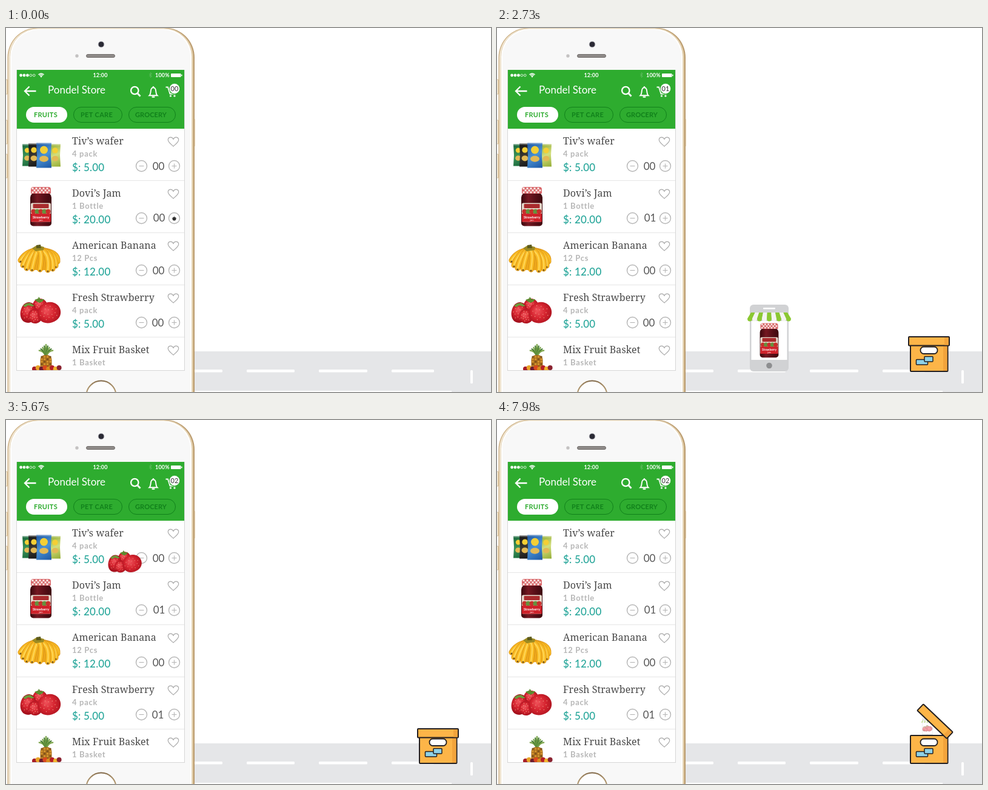
These frames come from a looping animation (800 px wide and 600 px high, 8 s). An HTML page with a canvas:

```html
<!DOCTYPE html>
<html lang="en">
<head>
<meta charset="utf-8">
<title>Store order</title>
<style>
  html, body { margin: 0; width: 100%; height: 100%; overflow: hidden; background: #fff; }
  canvas { display: block; }
</style>
</head>
<body>
<canvas id="stage" width="800" height="600"></canvas>
<script>
const LOOP = 8000, STEP = 70, SECOND_TAP = 4480, CYCLE = 4550;
const SANS = 'Lato, "Open Sans", sans-serif', SERIF = '"Noto Serif", serif';
const GREEN = '#2eac2f', GREY = '#b5b5b5', INK = '#231f20';

const stage = document.getElementById('stage').getContext('2d');
const layer = document.createElement('canvas');
layer.width = 800;
layer.height = 600;
const layerCtx = layer.getContext('2d');
let g = stage;

// ---------- helpers ----------
function paint(fill, stroke, width = 1) {
  if (fill) { g.fillStyle = fill; g.fill(); }
  if (stroke) { g.strokeStyle = stroke; g.lineWidth = width; g.stroke(); }
}
function box(x, y, w, h, r, fill, stroke, width) {
  g.beginPath();
  g.roundRect(x, y, w, h, r);
  paint(fill, stroke, width);
}
function oval(x, y, rx, ry, fill, stroke, width) {
  g.beginPath();
  g.ellipse(x, y, rx, ry, 0, 0, Math.PI * 2);
  paint(fill, stroke, width);
}
const disc = (x, y, r, fill, stroke, width) => oval(x, y, r, r, fill, stroke, width);
function shape(d, fill, stroke, width = 1) {
  const path = new Path2D(d);
  if (fill) { g.fillStyle = fill; g.fill(path); }
  if (stroke) { g.strokeStyle = stroke; g.lineWidth = width; g.stroke(path); }
}
function text(str, x, y, font, fill, spacing = 0, align = 'left') {
  g.font = font;
  g.letterSpacing = spacing + 'px';
  g.textAlign = align;
  g.fillStyle = fill;
  g.fillText(str, x, y);
}
function at(x, y, scale, draw) {
  g.save();
  g.translate(x, y);
  g.scale(scale, scale);
  draw();
  g.restore();
}
function blend(x0, y0, x1, y1, ...colours) {
  const fill = g.createLinearGradient(x0, y0, x1, y1);
  colours.forEach((colour, i) => fill.addColorStop(i / (colours.length - 1), colour));
  return fill;
}
// Composite a whole drawing at one opacity.
function faded(alpha, draw) {
  if (alpha <= 0) return;
  if (alpha >= 1) return draw();
  layerCtx.clearRect(0, 0, 800, 600);
  g = layerCtx;
  draw();
  g = stage;
  g.globalAlpha = alpha;
  g.drawImage(layer, 0, 0);
  g.globalAlpha = 1;
}
// Linear interpolation through [time, value] pairs.
function track(t, ...keys) {
  if (t <= keys[0][0]) return keys[0][1];
  for (let i = 1; i < keys.length; i++) {
    const [t0, a] = keys[i - 1], [t1, b] = keys[i];
    if (t <= t1) return a + (b - a) * (t - t0) / (t1 - t0);
  }
  return keys[keys.length - 1][1];
}
const easeInOut = p => p < .5 ? 4 * p ** 3 : 1 - (2 - 2 * p) ** 3 / 2;
const two = n => String(n).padStart(2, '0');

// ---------- products, centred on the origin ----------
function chips() {
  const bag = (x, y, w, h, dark, light) => {
    const fill = blend(x, y, x + w, y + h, dark, light, dark);
    shape(`M${x} ${y}H${x + w}L${x + w - 1} ${y + h / 2}L${x + w} ${y + h}H${x}L${x + 1} ${y + h / 2}Z`, fill);
    box(x, y, w, 2, 0, '#ffffff55');
    disc(x + w / 2, y + h * .28, w * .26, '#f4cf35');
    oval(x + w / 2, y + h * .64, w * .3, h * .12, '#e3b955');
  };
  bag(-31, -18, 16, 36, '#17653a', '#3b9257');
  bag(-21, -19, 18, 38, '#131315', '#3a3832');
  bag(14, -18, 18, 37, '#93ac34', '#d3df7e');
  bag(-8, -20, 25, 41, '#1d57a4', '#4a92d4');
}
function jar() {
  box(-17.5, -23, 35, 55, [8, 8, 5, 5], blend(-18, 0, 18, 0, '#38080d', '#741821', '#560f17', '#3d080e'));
  box(-16.5, -32.5, 33, 11, [4, 4, 1, 1], '#d9686b');
  for (let i = 0; i < 15; i++) {
    box(-15 + (i % 5) * 6 + (i > 4 && i < 10 ? 3 : 0), -31.5 + Math.floor(i / 5) * 3.2, 3, 3, 0, '#f7e6e2');
  }
  box(-16.5, -6, 33, 31, 2, '#e8ddcf');
  box(-13, -4.5, 26, 7, 1, '#a92b2d');
  for (let i = 0; i < 5; i++) {
    disc(-12 + i * 6, 8, 4, i % 2 ? '#66913d' : '#c92e2b');
  }
  box(-16.5, 11.5, 33, 13.5, 0, '#cf222b');
  text('Strawberry', 0, 19, '700 5.5px ' + SANS, '#fff', 0, 'center');
  text('jam', 0, 23.5, '4px ' + SANS, '#fff', 0, 'center');
}
function bananas() {
  const tips = [[-30, 3], [31, 5], [-26, 11], [28, 12], [-20, 16], [23, 17], [-11, 17], [15, 19], [2, 18]];
  shape('M-3 -17Q-22 -15 -29 4L-18 16Q4 23 22 16L30 5Q22 -14 5 -17Z', '#eda71b');
  g.lineCap = 'round';
  for (const [x, y] of tips) {
    const curve = `M${x * .12} -14Q${x * .9 + 5} -11 ${x} ${y}`;
    shape(curve, null, '#d78e15', 9);
    shape(curve, null, '#f8b922', 7.5);
    shape(curve, null, '#ffd452', 2.5);
    disc(x, y + 2, 1.5, '#70501f');
  }
  shape('M-11 -17L-3 -22L9 -19L8 -14L-5 -12Z', '#9b8a22');
  shape('M-4 -22L3 -23L4 -17L-4 -17Z', '#5d5b1c');
  g.lineCap = 'butt';
}
function strawberries() {
  const berry = (x, y, rx, ry, turn) => {
    g.save();
    g.translate(x, y);
    g.rotate(turn);
    const red = g.createRadialGradient(-rx * .2, -ry * .3, 1, 0, 0, rx * 1.2);
    red.addColorStop(0, '#ee5058');
    red.addColorStop(.5, '#d5242f');
    red.addColorStop(1, '#a3101c');
    shape(`M0 ${-ry}C${rx * 1.3} ${-ry} ${rx * 1.4} ${ry} 0 ${ry}C${-rx * 1.4} ${ry} ${-rx * 1.3} ${-ry} 0 ${-ry}`, red);
    for (let i = 1; i < 18; i++) {
      const a = i * 2.4, r = Math.sqrt(i / 18) * .8;
      disc(Math.cos(a) * r * rx, Math.sin(a) * r * ry, .7, '#f2a08a');
    }
    g.restore();
  };
  berry(-1, -7, 12, 12, 0);
  shape('M-10 -17L-4 -19L-3 -22L0 -18L6 -18L3 -14L-2 -12L-6 -14Z', '#5c8a2f');
  berry(-20, 4, 13, 17, .15);
  berry(-9, 10, 11, 12, -.3);
  shape('M-29 -7L-24 -11L-17 -12L-10 -7L-15 -6L-20 -8L-25 -5Z', '#6d9a3b');
  berry(14, 4, 19, 17, -.3);
}
function basket() {
  g.lineCap = 'round';
  for (let i = -4; i <= 4; i++) {
    shape(`M0 0Q${i} -10 ${i * 2.8} ${-20 + Math.abs(i) * 2.4}`, null, i % 2 ? '#477d32' : '#7aa349', 2.3);
  }
  g.lineCap = 'butt';
  box(-9.5, -3, 19, 30, 8, '#a86c1e');
  for (let i = 0; i < 24; i++) {
    disc(-7 + (i % 4) * 4.7, Math.floor(i / 4) * 4, 1.6, i % 3 ? '#d99b30' : '#7b511a');
  }
  const fruit = ['#a51c27', '#e9a427', '#6b1c31', '#d9481f', '#d98c1f', '#b72027', '#f1b52c', '#8a2230'];
  fruit.forEach((colour, i) => disc(-19 + i * 5.8, 20 - (i % 2) * 2, 4, colour));
}

// ---------- shop screen ----------
const products = [
  { name: 'Tiv’s wafer', pack: '4 pack', price: '5.00', draw: chips, x: 58, y: 209.5, countX: 251.5 },
  { name: 'Dovi’s Jam', pack: '1 Bottle', price: '20.00', draw: jar, x: 57.5, y: 294.5, countX: 252.5, lift: 1 },
  { name: 'American Banana', pack: '12 Pcs', price: '12.00', draw: bananas, x: 54, y: 380, countX: 251.5 },
  { name: 'Fresh Strawberry', pack: '4 pack', price: '5.00', draw: strawberries, x: 57, y: 465, countX: 250.5 },
  { name: 'Mix Fruit Basket', pack: '1 Basket', draw: basket, x: 66, y: 542 }
];

function device() {
  const gold = '#d6bd95';
  for (const [y, h] of [[85, 24], [152, 39], [208, 39]]) box(-2, y, 4.5, h, 1, '#f1e4cd', gold, 1);
  box(309, 150, 3.5, 45, 1, '#f1e4cd');
  box(2.5, -.5, 308.5, 760, 49, blend(2, 0, 311, 0, '#cdb186', '#dcc8a4', '#b8986a'));
  box(4, .5, 305, 760, 48, blend(2, 0, 311, 0, '#f3e8d5', '#f6eee0', '#e0cba6'));
  box(6.5, 1, 300, 760, 46.5, '#fff', '#e6d8be', 1);
  box(9, 3, 295, 760, 45, '#f8f8f8');
  disc(157, 27, 5, '#2b2a35', '#cfcfd4', 1);
  disc(117, 46, 2.7, '#c4c2c2');
  box(132.5, 43.5, 47, 5, 2.5, '#8f8b89', '#6f6b69', 1);
  disc(157, 606, 24.5, '#fdfdfd', blend(132, 0, 182, 0, '#b39a72', '#7d6546', '#b39a72'), 2);
  box(17, 69, 278, 496, 0, '#d6d6d6');
  box(18, 69, 276, 495, 0, '#fff');
}

function statusBar() {
  for (let i = 0; i < 5; i++) {
    disc(24.6 + i * 5.4, 78, i < 3 ? 2.4 : 1.9, i < 3 ? '#fff' : null, i < 3 ? null : '#fff', .8);
  }
  for (const r of [2, 4, 6]) {
    g.beginPath();
    g.arc(58, 81, r, -Math.PI * .77, -Math.PI * .23);
    paint(null, '#fff', 1.4);
  }
  disc(58, 80.5, 1, '#fff');
  text('12:00', 155.5, 81, '700 9px ' + SANS, '#fff', .2, 'center');
  shape('M236 75.5L240.5 79.5L238.3 81.5V73.5L240.5 75.5L236 79.5', null, '#68bd68', .8);
  text('100%', 246, 81, '700 9px ' + SANS, '#fff', .2);
  box(272, 75, 16.5, 6, 1, '#fff');
  box(289, 76.5, 1.5, 3, 1, '#fff');
}

function header(total) {
  box(18, 69, 276, 97, 0, GREEN);
  statusBar();
  shape('M49.5 104H31M38.5 96.5L31 104L38.5 111.5', null, '#fff', 2.3);
  text('Pondel Store', 69, 108, '17px ' + SANS, '#fff');
  disc(212.3, 103, 6.2, null, '#fff', 2.3);
  shape('M216.7 107.5L221.5 112.5', null, '#fff', 2.8);
  shape('M236.5 111.2C239.5 108.5 238 102 240 99.8C241.5 97.8 244.5 97.8 246 99.8C248 102 246.5 108.5 249.5 111.2Z', null, '#fff', 1.9);
  disc(243, 97.3, 1.3, '#fff');
  box(240.5, 112.5, 5, 2.2, 1, '#fff');
  shape('M263.5 97.5H267L270.5 108.5H279L281 102H268.5', null, '#fff', 1.8);
  disc(271.5, 112, 1.6, '#fff');
  disc(278, 112, 1.6, '#fff');
  disc(278, 100, 9.2, GREEN);
  disc(278, 100, 8.3, '#fff');
  text(two(total), 278, 104, '11px ' + SANS, '#333', 0, 'center');

  const label = '700 11px ' + SANS, dark = '#11811b';
  box(33, 130, 68, 26, 13, '#fff');
  text('FRUITS', 46, 147, label, GREEN, .3);
  box(111.5, 130.5, 80, 25, 12.5, null, dark, 1);
  text('PET CARE', 123, 147, label, dark, .3);
  box(202.5, 130.5, 77, 25, 12.5, null, dark, 1);
  text('GROCERY', 213, 147, label, dark, .1);
}

function row(item, top, count) {
  at(item.x, item.y, 1, item.draw);
  text(item.name, 109, top + 26, '16px ' + SERIF, '#484848', .12);
  text(item.pack, 109, top + 46, '700 13px ' + SANS, '#b7b7b7', .7);
  at(276, top + 21.5, 1, () =>
    shape('M0 7.5C-4 4 -8.7 .5 -8.7 -3C-8.7 -8.2 -2 -9 0 -4.2C2 -9 8.7 -8.2 8.7 -3C8.7 .5 4 4 0 7.5Z', null, '#aaa', 1.2));
  if (!item.price) return;
  text('$: ' + item.price, 109, top + 70, '500 17px ' + SANS, '#26a69a', .2);
  const y = top + 61.5;
  for (const x of [223.5, 277.5]) {
    disc(x, y, 9, '#fff', GREY, 1.4);
    shape(`M${x - 4} ${y}H${x + 4}` + (x > 250 ? `M${x} ${y - 4}V${y + 4}` : ''), null, GREY, 1.1);
  }
  text(two(count), item.countX, y + 6 - (item.lift || 0), '17px ' + SANS, '#555', 0, 'center');
}

function shop(counts) {
  g.save();
  g.beginPath();
  g.rect(18, 69, 276, 495);
  g.clip();
  header(counts[1] + counts[3]);
  products.forEach((item, i) => {
    const top = 166 + i * 86;
    row(item, top, counts[i]);
    box(18, top + 85, 276, 1, 0, '#e6e6e6');
  });
  g.restore();
}

// ---------- street ----------
function road() {
  box(300, 533, 500, 67, 0, '#e5e6e8');
  for (const [x, end] of [[300, 357], [397, 476], [516, 596], [636, 706]]) {
    box(x, 563, end - x, 4.5, 1.5, '#fff');
  }
  box(766, 564, 4, 22, 1.5, '#fff');
  box(300, 598, 435, 2, 0, '#fff');
}

function shopPhone(draw) {
  box(-32, -55, 64, 110, 6, '#d1d2d4');
  box(-29.5, -28, 59, 64, 0, '#fff');
  box(-10, -50, 20, 2.5, 1, '#fff');
  disc(0, 45.5, 4.8, '#8d8e90');
  for (let i = 0; i < 9; i++) {
    const x = -30 + i * 60 / 9, low = -36 + i * 8;
    shape(`M${x} -42H${x + 6.7}L${low + 8} -32Q${low + 8} -27.5 ${low + 4} -27.5Q${low} -27.5 ${low} -32Z`, i % 2 ? '#f4f5f1' : '#8bc832');
  }
  at(0, 4, .88, draw);
}

function carton(angle) {
  const tan = '#fdb548', shade = '#f3a43c', edge = 2;
  box(682, 520, 61.5, 46, 1, tan, INK, edge);
  box(736, 521, 6.5, 44, 0, shade);
  box(698.5, 525.5, 28, 11.5, 5.5, '#fff', INK, 1.8);
  box(691.5, 546.5, 19, 8.5, 1, '#8ed2e8', INK, 1.5);
  box(705, 541.5, 14, 8.5, 1, '#8ed2e8', INK, 1.5);
  g.save();
  g.translate(742, 519);
  g.rotate(angle * Math.PI / 180);
  box(-63, -10, 67, 14.5, 1, tan, INK, edge);
  box(-4, -9, 7, 12.5, 0, shade);
  g.restore();
}

// ---------- motion ----------
function tap(c, y) {
  if (c < -70 || c > 350) return;
  g.globalAlpha = track(c, [0, 1], [350, 0]);
  disc(277.5, y, track(c, [-70, 1.5], [0, 3], [350, 17.5]), '#303030');
  g.globalAlpha = 1;
}

function flyToCart(c, item) {
  if (c < 350 || c > 1540) return;
  const p = easeInOut(track(c, [600, 0], [1540, 1]));
  const scale = track(c, [350, 1], [700, 1.37], [1540, .29]);
  at(item.x + (273.5 - item.x) * p, item.y + (104.5 - item.y) * p, scale, item.draw);
}

function deliver(c, item) {
  if (c < 2310 || c > 3500) return;
  const x = track(c, [2310, 245], [2380, 280], [2730, 449], [3150, 612], [3290, 664], [3430, 710], [3500, 713]);
  const y = track(c, [2380, 511], [2450, 520], [2520, 519], [2660, 510], [2730, 511], [2870, 508], [3290, 508], [3430, 507], [3500, 520]);
  const scale = track(c, [3080, 1], [3290, .66], [3430, .28], [3500, .1]);
  const alpha = track(c, [3150, 1], [3290, .72], [3430, .48], [3500, 0]);
  faded(alpha, () => at(x, y, scale, () => shopPhone(item.draw)));
}

function render(t) {
  const second = t >= SECOND_TAP;
  const c = second ? t - CYCLE : t;
  const index = second ? 3 : 1, item = products[index];
  const counts = [0, second ? 1 : 0, 0, 0, 0];
  if (c >= 210) counts[index] = 1;

  box(0, 0, 800, 600, 0, '#fff');
  road();
  deliver(c, item);
  device();
  shop(counts);
  tap(c, second ? 486 : 314.5);
  flyToCart(c, item);
  const lid = track(c, [3045, 0], [3290, 26.5], [3430, 43.5], [3570, 57], [3850, 0]);
  faded(track(t, [1610, 0], [2030, 1]), () => carton(lid));
}

let shown = -1;
function frame(now) {
  const t = Math.floor((now % LOOP) / STEP) * STEP;
  if (t !== shown) render(shown = t);
  requestAnimationFrame(frame);
}
render(0);
requestAnimationFrame(frame);
</script>
</body>
</html>
```
